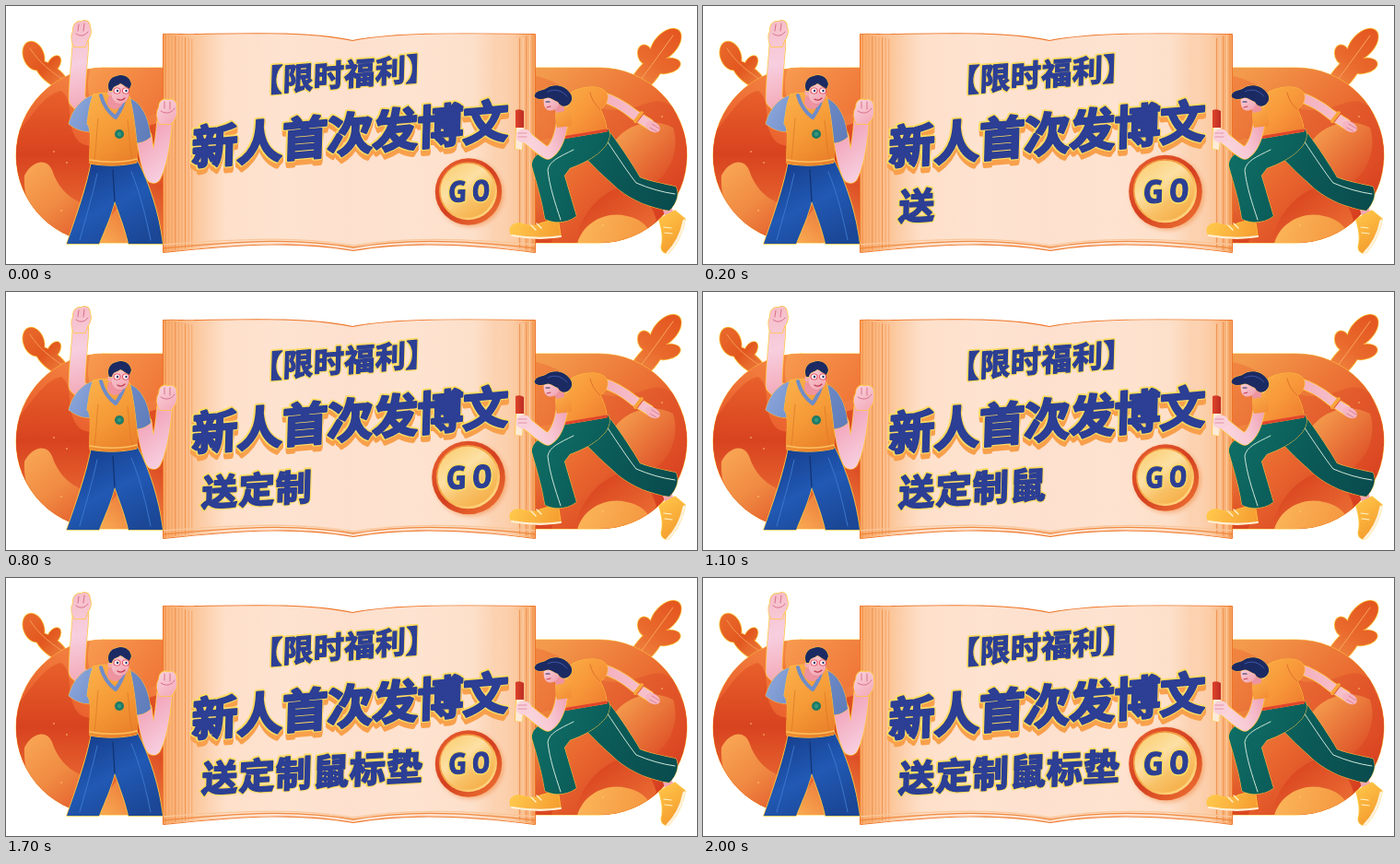
Recreate the animation shown at these times as an HTML page with a canvas. Size 750 by 280 pixels, loop 2300 ms.

```html
<!DOCTYPE html>
<html lang="zh-CN">
<head>
<meta charset="utf-8">
<title>新人首次发博文</title>
<style>
html, body { margin: 0; width: 100%; height: 100%; overflow: hidden; background: #fff; }
canvas { display: block; width: 750px; height: 280px; }
</style>
</head>
<body>
<canvas id="stage" width="750" height="280"></canvas>
<script>
const stage = document.getElementById('stage');
const scene = document.createElement('canvas');
scene.width = 750;
scene.height = 280;
let g = scene.getContext('2d');

const BLUE = '#2c3f94', GOLD = '#ffdc62', NAVY = '#1c2a63', EDGE = '#ffc83d';
const CJK = '"Noto Sans CJK SC", "Noto Sans CJK", sans-serif';

function grad(x0, y0, x1, y1, ...colors) {
  const fill = g.createLinearGradient(x0, y0, x1, y1);
  colors.forEach((c, i) => fill.addColorStop(i / (colors.length - 1), c));
  return fill;
}

function shape(d, fill, edge, width = 1.5) {
  const path = new Path2D(d);
  if (edge) {
    g.strokeStyle = edge;
    g.lineWidth = width;
    g.lineJoin = 'round';
    g.stroke(path);
  }
  g.fillStyle = fill;
  g.fill(path);
}

function line(d, color, width = 1) {
  g.strokeStyle = color;
  g.lineWidth = width;
  g.lineCap = g.lineJoin = 'round';
  g.stroke(new Path2D(d));
}

function limb(d, color, width) {
  line(d, EDGE, width + 1.5);
  line(d, color, width);
}

function oval(x, y, rx, ry, fill, turn = 0) {
  g.beginPath();
  g.ellipse(x, y, rx, ry, turn, 0, Math.PI * 2);
  g.fillStyle = fill;
  g.fill();
}

// Ovals merged into one outlined plant.
function plant(lobes, fill) {
  for (const [x, y, rx, ry, turn] of lobes) oval(x, y, rx + 0.8, ry + 0.8, EDGE, turn);
  for (const [x, y, rx, ry, turn] of lobes) oval(x, y, rx, ry, fill, turn);
}

// Tilted lettering: x is the left edge, y the middle line at that edge.
function lettering(text, x, y, { size, step, slope, bold, shadow = 0 }) {
  g.save();
  g.transform(1, slope, -0.03, 1, x, y);
  g.font = `900 ${size}px ${CJK}`;
  g.textAlign = 'center';
  g.textBaseline = 'alphabetic';
  g.lineJoin = 'round';
  const each = draw => [...text].forEach((c, i) => draw(c, (i + 0.5) * step, size * 0.38));
  g.strokeStyle = '#f8a04c';
  g.lineWidth = bold + 2;
  for (let d = 1; d <= shadow; d++) each((c, cx, cy) => g.strokeText(c, cx, cy + d));
  g.strokeStyle = GOLD;
  g.lineWidth = bold + 3;
  each((c, cx, cy) => g.strokeText(c, cx - 0.4, cy - 0.3));
  g.strokeStyle = g.fillStyle = BLUE;
  g.lineWidth = bold;
  each((c, cx, cy) => { g.strokeText(c, cx, cy); g.fillText(c, cx, cy); });
  g.restore();
}

function backdrop() {
  plant([[30, 54, 11, 16, -0.35], [52, 63, 10, 6, -1], [50, 75, 9, 22, -0.9]],
    grad(20, 38, 70, 90, '#ea6a2c', '#e2571f', '#f08a44'));
  line('M26 46C36 62 50 72 68 84', '#f59a58', 1);
  plant([[716, 42, 12, 21, 0.75], [694, 53, 8, 11, -0.3], [717, 65, 15, 8, -0.2], [695, 75, 11, 30, 0.7]],
    grad(675, 95, 730, 25, '#f39048', '#e9692c', '#e4551f'));
  line('M678 94C694 74 708 54 724 32', '#f7a562', 1);

  g.save();
  const pill = new Path2D();
  pill.roundRect(11, 67, 728, 190, 95);
  g.strokeStyle = EDGE;
  g.lineWidth = 1;
  g.stroke(pill);
  g.clip(pill);
  g.fillStyle = grad(100, 67, 25, 250, '#f58a45', '#e85a2a', '#d63a1e');
  g.fillRect(0, 60, 375, 205);
  g.fillStyle = grad(590, 70, 735, 220, '#f39a4c', '#ea6a30', '#d53a1e');
  g.fillRect(375, 60, 375, 205);

  shape('M0 150C25 128 38 96 60 92C76 104 62 130 80 148C100 160 110 140 190 120V258H0Z',
    grad(60, 92, 60, 230, '#e8602b', '#d8431f', '#e96a33'));
  shape('M92 67C84 92 92 112 112 126C132 138 150 110 190 116V67Z', grad(90, 70, 170, 130, '#f79a4f', '#ee7135'));
  shape('M20 184C28 168 44 164 50 178C56 196 66 206 78 212C92 222 98 240 96 260H60C36 246 18 216 20 184Z',
    grad(25, 170, 90, 255, '#f9a755', '#f08a42', '#e2572a'));
  shape('M11 190C22 220 44 240 74 258H20Z', '#cf351c');
  shape('M102 258C106 232 122 218 138 200C150 190 165 196 180 190V258Z', grad(110, 258, 170, 190, '#f8a650', '#dc4a23'));

  shape('M570 75C610 82 622 106 650 112C690 118 700 92 724 110L750 170C720 160 705 190 680 180C640 164 610 130 570 150Z',
    grad(580, 80, 730, 180, '#f08440', '#e66430', '#dd4a24'));
  shape('M656 154C670 128 700 120 724 132C732 156 720 184 700 194C680 190 668 174 656 154Z',
    grad(665, 130, 725, 190, '#f6a04f', '#dc4a24'));
  shape('M618 258C622 226 644 204 668 196C690 198 700 214 706 232L690 258Z', grad(640, 200, 680, 258, '#d9431f', '#ea6c33'));
  shape('M620 258C626 236 650 222 674 228C694 232 700 244 704 258Z', grad(625, 230, 700, 258, '#fbb558', '#f4953f'));
  shape('M570 170C590 180 600 210 592 258H570Z', grad(570, 170, 595, 258, '#f08a42', '#d9431f'));
  [[60, 222], [66, 170], [52, 158], [676, 168], [712, 120], [648, 238]].forEach(([x, y]) => oval(x, y, 0.8, 0.8, '#ffcf7a'));
  g.restore();
}

function book() {
  const page = 'M171 31C184 30 196 32 206 31C266 30 330 28 376 38C425 29 488 30 574 31V267C500 257 432 255 377 265C320 255 262 257 171 267Z';
  shape(page, grad(171, 0, 574, 0, '#f9b47a', '#fee0ca', '#fee3d1', '#fde0cd', '#fee3d1', '#fde0ca', '#f9b883'), '#ee7426', 2);
  g.save();
  g.clip(new Path2D(page));
  g.fillStyle = grad(171, 0, 240, 0, '#f9ab6a', '#fbc79c', '#fee0ca00');
  g.fillRect(171, 25, 69, 245);
  g.fillStyle = grad(530, 0, 574, 0, '#fee0ca00', '#fbcaa2', '#f7a868');
  g.fillRect(530, 25, 44, 245);
  for (let i = 0; i < 9; i++) {
    const x = 173 + i * 3.6;
    line(`M${x} ${31 + i * 0.6}V${266 - i * 0.5}`, i % 3 ? '#f4a060' : '#ee8238', 0.8);
  }
  for (let i = 0; i < 6; i++) {
    const x = 572 - i * 3.6;
    line(`M${x} ${31 + i}V${266 - i}`, i % 2 ? '#fbd2a6' : '#f08c46', 0.9);
  }
  for (const d of [0, 4]) {
    line(`M171 ${263 - d}C262 ${254 - d / 2} 320 ${252 - d / 2} 377 ${262 - d / 2}C432 ${252 - d / 2} 500 ${254 - d / 2} 574 ${263 - d}`, d ? '#f9c79a' : '#f08a40', 1.3);
  }
  g.restore();
}

function man() {
  const skin = grad(68, 15, 90, 110, '#f6bcc6', '#f7cfdf', '#f3a9b8');
  shape('M93 168C88 196 76 230 66 258H101C107 243 114 228 118 212C124 228 130 244 133 258H170C166 226 156 194 142 167Z',
    grad(95, 170, 140, 258, '#17408f', '#2159b4', '#1b4796'), EDGE);
  line('M99 182C94 206 86 232 80 254M136 180C146 204 152 230 157 254', '#3a76cc', 1);
  line('M116 178L118 212', '#12316e', 1.2);

  limb('M81 40C80 60 77 80 77 102L88 112', skin, 17);
  shape('M73 27C72 20 77 16 82 17C86 14 91 17 91 22C93 27 92 33 88 38L86 44H74C71 39 70 32 73 27Z', skin, EDGE);
  line('M79 20L78 27M85 19L84 27M76 30C81 34 86 32 89 28', '#d9708a', 1);

  limb('M150 142C152 160 156 176 160 184C166 172 170 150 172 126', grad(150, 145, 178, 180, '#f3a9bd', '#f7cfe0'), 16);
  shape('M166 110C166 103 171 100 176 102C181 100 186 104 185 110C187 117 183 124 179 128H167C163 122 163 115 166 110Z',
    grad(165, 102, 186, 128, '#f8d2dc', '#f3a6b6'), EDGE);
  line('M172 104V111M178 104V112M168 114C174 118 180 116 183 111', '#d9708a', 1);

  const sleeve = grad(70, 98, 156, 148, '#8fa9dc', '#6f8cc8', '#5f7cba');
  shape('M95 97C82 100 72 112 68 128C76 134 84 137 92 136L100 112Z', sleeve, EDGE, 1);
  shape('M130 99C144 102 154 116 157 142C152 147 144 149 139 149L129 122Z', sleeve, EDGE, 1);
  shape('M95 96C106 93 124 94 134 98C138 114 140 130 142 150L142 170C126 174 106 174 91 171C90 152 94 134 88 128C90 114 91 104 95 96Z',
    grad(92, 96, 142, 172, '#fbb04a', '#f59a36', '#e87c28'), EDGE, 1);
  line('M103 97C106 108 112 116 119 121C124 114 128 106 129 98', '#6f8cc8', 4);
  line('M91 167C108 170 126 170 142 166', '#fcc062', 1.6);
  line('M100 122C98 140 98 154 96 166M132 124C134 140 134 154 137 166', '#df7a28', 0.8);
  oval(123, 139, 5, 5, '#1f7a66');
  oval(123, 139, 2.2, 2.2, '#35987c');

  shape('M111 98L110 106C114 114 122 114 127 106L127 98Z', '#ee93a0');
  shape('M114 84C120 80 130 81 134 86L133 98C131 105 125 108 119 105C114 101 113 93 114 84Z',
    grad(114, 84, 134, 106, '#f8cdd6', '#f1a0ac'), '#e8768a', 0.6);
  oval(113, 94, 2.6, 3.6, '#f3a9b4');
  shape('M112 92C109 84 113 77 120 76C127 73 135 77 136 85L134 90C130 88 127 85 124 84C121 87 116 86 115 92Z', NAVY, EDGE, 1);
  for (const x of [120.5, 130]) {
    oval(x, 92, 4, 3.6, '#e4475a');
    oval(x, 92, 3, 2.7, '#fdeef0');
    oval(x + 0.5, 92, 1.1, 1.3, NAVY);
  }
  line('M121 101C124 103 127 102 129 100', '#c23850', 1.2);
}

function runner() {
  const pants = grad(580, 140, 725, 220, '#0f6f66', '#0b5b58', '#0a4b4e');
  const skin = grad(560, 110, 705, 135, '#f9d0da', '#f4acba', '#f7c4cf');

  line('M716 214L721 230', '#f3a6b4', 10);
  shape('M709 232C714 228 720 226 726 222L737 231C735 246 727 260 719 268C713 269 710 264 712 258C714 248 711 240 709 232Z',
    grad(708, 225, 735, 262, '#ffc64a', '#f49a2c'), EDGE);
  line('M736 233C733 248 726 260 718 268', '#fff1d8', 3);
  line('M714 240L722 241M715 246L723 247', '#fff3c9', 1.2);
  shape('M612 146L656 138C668 154 680 172 688 186C700 191 714 193 727 196C731 204 728 214 720 222C700 219 680 211 665 199C650 186 636 172 624 160Z', pants, EDGE, 1);
  line('M652 146C664 164 676 182 684 192C698 198 712 202 726 204', '#cfe6d8', 1);

  line('M598 226L592 238', '#f3a6b4', 10);
  shape('M580 236L599 231L602 250C586 253 566 251 549 249C545 242 548 236 558 236C566 239 574 240 580 236Z',
    grad(550, 232, 600, 252, '#ffc84c', '#f59d30'), EDGE);
  line('M549 249C566 252 584 253 602 250', '#fff1d8', 2.2);
  line('M570 238L575 243M576 236L581 241', '#fff3c9', 1.4);
  shape('M600 134L654 134C660 150 640 166 612 176L606 184L619 228C608 236 594 236 585 231C582 210 576 192 571 174C570 162 584 156 596 150Z', pants, EDGE, 1);
  line('M616 156C600 164 590 168 588 178C590 196 596 214 602 232', '#cfe6d8', 1);

  limb('M645 98C660 102 670 108 682 118L698 128', skin, 10);
  line('M683 125L690 116', '#f8a53a', 4);
  line('M685 126L692 117', '#e0452c', 1);
  oval(702, 131, 8.5, 5.5, '#f5b5c2', 0.5);
  line('M701 128L709 133M699 132L706 136', '#d9708a', 0.8);

  shape('M598 108C606 96 620 88 636 88C648 88 656 94 652 104C650 108 648 110 645 112C650 122 652 130 652 136L604 144C600 132 594 120 598 108Z',
    grad(600, 90, 652, 142, '#fbae46', '#f8983a', '#ee7a2e'), EDGE, 1);
  line('M604 143L652 135', '#e0452c', 3);
  line('M634 94C636 102 640 108 645 112', '#e0702a', 1);
  line('M598 108C603 112 608 110 612 104', '#fdd08a', 2.5);

  limb('M604 124C602 140 598 154 588 160C580 156 572 148 564 142', grad(562, 140, 606, 126, '#fad6de', '#f8c8d4', '#f0a4b6'), 12);
  shape('M599 108C608 106 615 114 614 130L598 132C595 122 596 114 599 108Z', grad(598, 108, 614, 132, '#fbb04a', '#f28a34'));
  shape('M554 132L562 132L560 156L553 155Z', '#fdebd8', EDGE, 1);
  shape('M553 113Q558 111 562 114L562 132L553 132Z', grad(552, 0, 563, 0, '#e2452c', '#b92c22'));
  oval(562, 141, 8.5, 7.5, '#f9d0da');
  line('M556 138L565 138M556 142L565 142', '#e08ca0', 0.9);

  shape('M592 102L606 102L606 114L597 116Z', '#ee93a0');
  shape('M584 98C590 94 600 96 601 104C600 111 594 115 588 113C584 111 583 106 584 98Z',
    grad(584, 98, 600, 113, '#f9d0da', '#f0a0ae'));
  shape('M574 96C576 91 583 92 587 89C594 84 606 86 611 93C616 98 615 105 609 108C605 110 601 108 599 104C594 102 590 98 586 100C581 102 572 101 574 96Z', NAVY, EDGE, 1);
  line('M588 93C596 89 604 92 609 98', '#3c57a5', 1);
  line('M586 104L590 104', NAVY, 1.2);
  line('M587 110L591 109', '#c23850', 1);
}

function button(scale) {
  g.save();
  g.translate(502, 201.5);
  g.scale(scale, scale);
  g.shadowColor = '#f0843c88';
  g.shadowBlur = 5;
  g.shadowOffsetX = g.shadowOffsetY = 2;
  oval(0, 0, 36.2, 36.2, grad(-24, -28, 25, 28, '#e4582c', '#d43f20', '#e9692f'));
  g.shadowColor = 'transparent';
  oval(-0.5, -0.8, 31.5, 31.5, grad(-22, -25, 22, 25, '#f08a38', '#f6b04c', '#ffd884'));
  oval(-1, -1.2, 29.5, 29.5, grad(-18, -26, 18, 26, '#fbd27c', '#fde0a4', '#f8c166', '#f5ae48'));
  g.transform(1, -0.04, -0.03, 1, 0, 0);
  g.font = '900 31px "Noto Sans Mono", "DejaVu Sans Mono", monospace';
  g.textAlign = 'center';
  g.textBaseline = 'alphabetic';
  g.lineJoin = 'round';
  g.fillStyle = BLUE;
  [['G', -12], ['O', 13.5]].forEach(([c, x]) => {
    g.strokeStyle = GOLD;
    g.lineWidth = 4;
    g.strokeText(c, x, 10.5);
    g.strokeStyle = BLUE;
    g.lineWidth = 1;
    g.strokeText(c, x, 10.5);
    g.fillText(c, x, 10.5);
  });
  g.restore();
}

backdrop();
book();
man();
runner();
lettering('【限时福利】', 267, 82, { size: 33, step: 33.4, slope: -0.08, bold: 1.3 });
lettering('新人首次发博文', 202, 153.5, { size: 50, step: 49, slope: -0.088, bold: 2.4, shadow: 6 });
g = stage.getContext('2d');

const LOOP = 2300, PRIZE = '送定制鼠标垫';
const prizeStyle = { size: 39, step: 40.1, slope: -0.058, bold: 1.8 };

function frame(now) {
  const t = now % LOOP;
  const step = t < 200 ? 0 : 1 + Math.floor((t - 200) / 300);
  g.clearRect(0, 0, 750, 280);
  g.drawImage(scene, 0, 0);
  lettering(PRIZE.slice(0, step), 212, 217.5, prizeStyle);
  button(step % 2 ? 1.1 : 1);
  requestAnimationFrame(frame);
}

requestAnimationFrame(frame);
</script>
</body>
</html>
```
